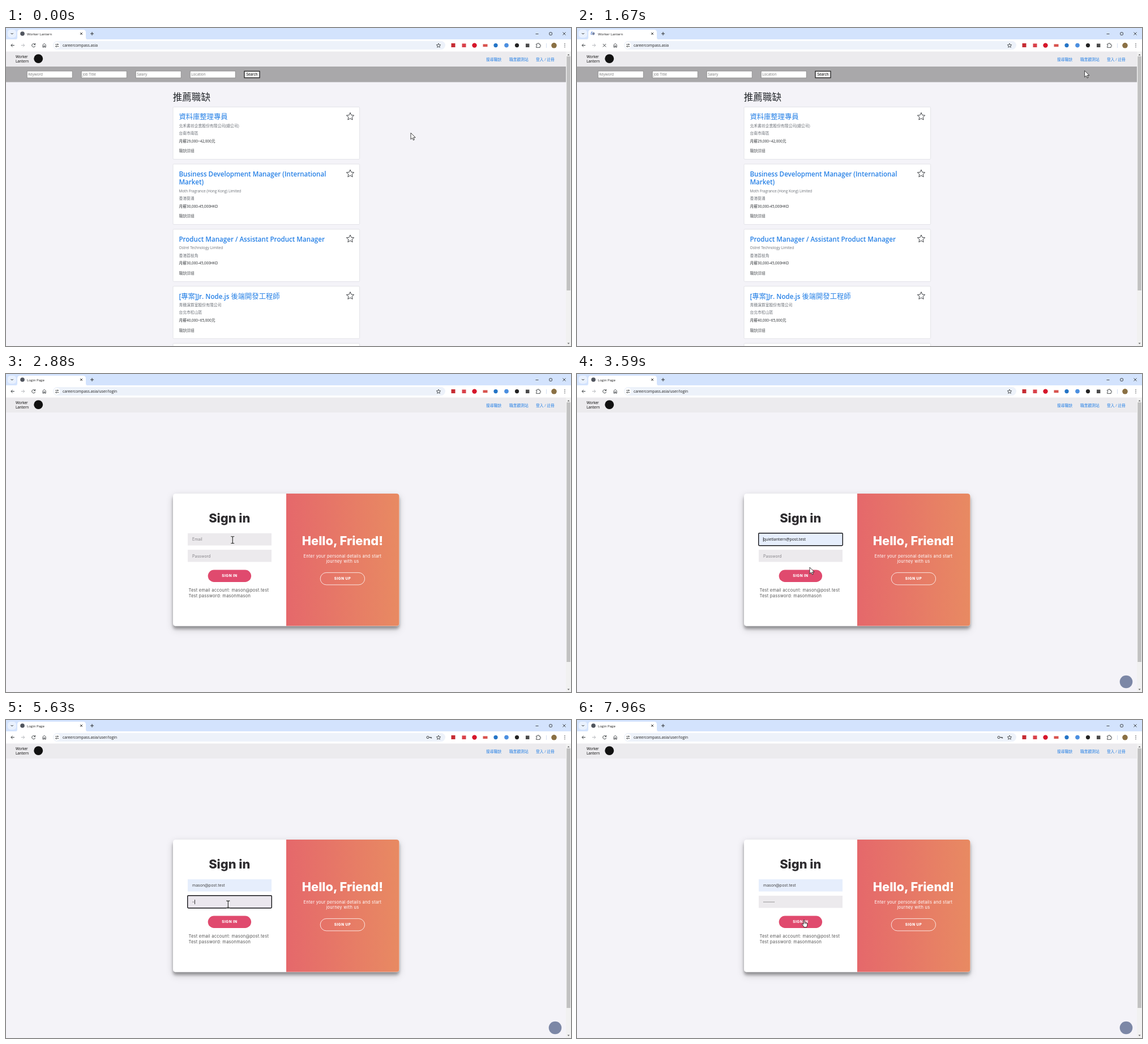
An HTML page that plays this animation: 998 px wide and 561 px high, repeating every 8 s.

```html
<!DOCTYPE html>
<html lang="zh-Hant">
<head>
<meta charset="utf-8">
<title>Job board sign-in</title>
<style>
  html, body { margin: 0; width: 100%; height: 100%; overflow: hidden; background: #f4f3f8; }
  svg { display: block; width: 100%; height: 100%; }
  text { font-family: "Open Sans", "Noto Sans CJK TC", "Noto Sans CJK", sans-serif; white-space: pre; }
  .brand, .brand text { font-family: Inter, sans-serif; }
  text.system { font-family: "Open Sans", sans-serif; }
</style>
</head>
<body>
<svg id="stage" viewBox="0 0 998 561" xmlns="http://www.w3.org/2000/svg"></svg>
<script>
const LOOP = 8000;
const BLUE = '#2680e6', INK = '#212529', GREY = '#6c7178';
const MAIL = 'mason@post.test', OTHER_MAIL = 'quietlantern@post.test';

// Moments of the session, in ms
const CLICK_LINK = 1480, PAGE_IN = 1900, FONTS_IN = 2600, LOADED = 2850, BADGE_IN = 3000;
const MAIL_FOCUS = 3100, PREVIEW = 3300, PREVIEW_2 = 3800, MAIL_SET = 4300;
const PASS_FOCUS = 5000, TYPE_START = 5200, KEY_GAP = 190, PASS_LENGTH = 10, SUBMIT = 7850;

// Pointer path: time, x, y
const PATH = [
  [0, 715, 185], [120, 715, 185], [800, 844, 49], [1200, 951, 57], [1520, 951, 57],
  [2210, 508, 206], [2900, 400, 293], [3150, 400, 293], [3590, 411, 341], [4330, 409, 343],
  [4800, 392, 327], [5100, 392, 326], [6550, 393, 323], [7250, 393, 323], [7720, 401, 353], [LOOP, 401, 353]
];

const rect = (x, y, w, h, fill, more = '') =>
  `<rect x="${x}" y="${y}" width="${w}" height="${h}" fill="${fill}" ${more}/>`;
const circle = (x, y, r, fill, more = '') => `<circle cx="${x}" cy="${y}" r="${r}" fill="${fill}" ${more}/>`;
const line = (d, color = '#3c4043', width = 1, more = '') =>
  `<path d="${d}" fill="none" stroke="${color}" stroke-width="${width}" ${more}/>`;
const text = (x, y, size, fill, s, more = '') =>
  `<text x="${x}" y="${y}" font-size="${size}" fill="${fill}" ${more}>${s}</text>`;
const group = (id, body, more = '') => `<g id="${id}" ${more}>${body}</g>`;

// Han runs are set a little larger and lighter than Latin ones
const mixed = (x, y, size, fill, s, more = '') => text(x, y, size, fill,
  s.split(/([\u2e80-\u9fff]+)/).map((run, i) => i % 2
    ? `<tspan font-size="${(size * 1.06).toFixed(2)}" font-weight="400">${run}</tspan>` : run).join(''), more);

function star(cx, cy, r, color, width) {
  const points = Array.from({ length: 10 }, (_, i) => {
    const a = (i / 5 - 0.5) * Math.PI, d = i % 2 ? r * 0.46 : r;
    return `${(cx + d * Math.cos(a)).toFixed(2)} ${(cy + d * Math.sin(a)).toFixed(2)}`;
  });
  return line(`M${points.join('L')}Z`, color, width, 'stroke-linejoin="round"');
}

function browser() {
  const tabs = rect(0, 0, 998, 21, '#d3e3fd') + rect(3, 3, 15, 14, '#e9f1fe', 'rx="5"') +
    line('M8.6 9l2 2l2-2', '#1f1f1f') +
    '<path d="M16 20.5q4 0 4-4V8q0-5 5-5H136q5 0 5 5v8.5q0 4 4 4Z" fill="#fff"/>' +
    text(37, 12.6, 6.1, '#1f1f1f', '', 'id="tabTitle"') +
    group('favicon', circle(29, 10, 3.8, '#50555e')) +
    group('spinner', circle(29, 10, 2.4, '#7886a5') + line('M29 6A4 4 0 0 1 33 10', '#3569c8', 1.1)) +
    line('M131 8l4 4m0-4l-4 4M149 10h6m-3-3v6', '#1f1f1f', 0.9) +
    line('M935.5 10.5h5M983.5 7.5l5 5m0-5l-5 5', '#1f1f1f', 0.8) +
    rect(959.8, 7.8, 4.6, 4.6, 'none', 'rx="1" stroke="#1f1f1f" stroke-width=".8"');
  const bar = rect(0, 20, 998, 21.5, '#fff') + rect(83, 23, 693, 15, '#edf2fa', 'rx="7.5"') +
    line('M14.8 30.6H9m2.6-2.8L8.8 30.6l2.8 2.8') +
    line('M26.8 30.6h5.8m-2.6-2.8l2.8 2.8l-2.8 2.8', '#b4b7bb') +
    group('reload', line('M51 28.7A3 3 0 1 0 51.6 31.5M51.6 27v2.4h-2.4')) +
    group('stop', line('M45.8 28l5.4 5.4m0-5.4l-5.4 5.4')) +
    line('M65 34V29.6L67.6 27.4L70.2 29.6V34H68.4V31.4H66.8V34Z', '#3c4043', 0.9) +
    circle(90, 30.6, 5.8, '#fff') +
    line('M87 29h2.6m2.6 0h1M87 32.5h1m2.6 0h2.6', '#3c4043', 0.9) +
    circle(91, 29, 1, 'none', 'stroke="#3c4043" stroke-width=".8"') +
    circle(89, 32.5, 1, 'none', 'stroke="#3c4043" stroke-width=".8"') +
    text(100, 33, 6.75, '#1f1f1f', '', 'id="address"') +
    group('key', circle(745, 30.6, 2, 'none', 'stroke="#3c4043"') + line('M747 30.6h4.6v2m-1.8-2v1.6')) +
    star(764, 31, 3.9, '#3c4043', 0.9);
  const tools = rect(786.5, 27, 7, 7, '#c62c33') + rect(805.5, 27.5, 7, 6.5, '#d9414a', 'id="toolMark"') +
    circle(827.5, 30.6, 4.2, '#d6162a') + rect(842.5, 28.5, 8, 4.6, '#d8534e') +
    circle(865, 30.6, 3.6, '#2374c6') + circle(884, 30.6, 3.8, '#4b8fe0') +
    circle(902.5, 30.6, 3.6, '#222') + rect(918, 27.6, 6.4, 6.4, '#4a4a4a') +
    line('M936.6 28.2h2.2q0-1.6 1.2-1.6t1.2 1.6h2v2q1.4 0 1.4 1.1t-1.4 1.1v2h-6.6v-2q1.2 0 1.2-1.1t-1.2-1.1Z', '#3c4043', 0.9) +
    line('M954.5 27v8', '#c9d7ee', 0.8) + circle(968, 30.8, 4.8, '#8a7044') +
    [27.8, 30.6, 33.4].map(y => circle(987, y, 0.75, '#3c4043')).join('');
  return tabs + bar + tools;
}

const site = () => rect(0, 41, 989, 520, '#f4f3f8') + rect(0, 41, 989, 27, '#ecebee') +
  text(17, 53, 6.4, '#000', 'Worker') + text(17, 61, 6.4, '#000', 'Lantern') + circle(57.2, 54.2, 7.9, '#111') +
  mixed(848, 58, 6.4, BLUE, '搜尋職缺') + mixed(889, 58, 6.4, BLUE, '職業觀測站') +
  mixed(936, 58, 6.4, BLUE, '登入 / 註冊') +
  rect(989, 41, 9, 520, '#f1f1f1') + rect(990.3, 50, 6.6, 413, '#c1c1c1', 'id="thumb"') +
  '<path d="M991.6 48.3l2-2.4l2 2.4ZM991.6 555.4l2 2.4l2-2.4Z" fill="#606060"/>';

function job(y, titles, lines) {
  const extra = (titles.length - 1) * 14.3;
  const colors = [GREY, GREY, INK, '#5a5d61'], drops = [35.2, 48.8, 62.4, 80];
  return rect(295, y, 329.6, 92.3 + extra, '#fff', 'rx="1.5" stroke="#dedde2" stroke-width=".8"') +
    star(608, y + 17, 7, '#2b2e33', 0.9) +
    titles.map((s, i) => mixed(305.4, y + 22 + i * 14.3, 11.6, BLUE, s, 'font-weight="600"')).join('') +
    [...lines, '職缺詳細'].map((s, i) => mixed(305.4, y + drops[i] + extra, 6.45, colors[i], s)).join('');
}

function home() {
  const fields = ['Keyword', 'Job Title', 'Salary', 'Location'].map((s, i) => {
    const x = 37.2 + i * 96;
    return rect(x, 76, 80, 12, '#fff', 'stroke="#858585" stroke-width=".8"') + text(x + 2, 84.4, 6.4, '#777', s);
  }).join('');
  return rect(0, 68, 989, 27.5, '#a9a8aa') + fields +
    rect(421, 76.2, 27, 11.6, '#f0f0f0', 'stroke="#151515" stroke-width="1.2"') +
    text(434.5, 84.3, 6.3, '#000', 'Search', 'text-anchor="middle"') +
    mixed(294.8, 128, 15.6, INK, '推薦職缺') +
    job(139.3, ['資料庫整理專員'], ['北禾書坊企業股份有限公司(總公司)', '台南市南區', '月薪29,000~42,000元']) +
    job(240, ['Business Development Manager (International', 'Market)'],
      ['Moth Fragrance (Hong Kong) Limited', '香港葵涌', '月薪30,000-45,000HKD']) +
    job(355, ['Product Manager / Assistant Product Manager'],
      ['Ostrel Technology Limited', '香港荔枝角', '月薪30,000-45,000HKD']) +
    job(455.6, ['[專案]Jr. Node.js 後端開發工程師'],
      ['青穗演算室股份有限公司', '台北市松山區', '月薪40,000~65,000元']) +
    rect(295, 556.3, 329.6, 20, '#fff', 'rx="1.5" stroke="#dedde2" stroke-width=".8"');
}

function login() {
  const mid = 'text-anchor="middle"', spaced = 'letter-spacing=".26"', label = `${mid} font-weight="800" letter-spacing=".52"`;
  const copy = text(394.8, 262.4, 21.8, '#2e2c2f', 'Sign in', `${mid} font-weight="800"`) +
    text(329, 294.4, 7, '#858388', 'Email', 'id="mailHint"') +
    text(329, 323.5, 7, '#858388', 'Password', 'id="passHint"') +
    text(395, 358.2, 6.4, '#fff', 'SIGN IN', label) +
    text(322.4, 384.4, 7.5, '#555', `Test email account: ${MAIL}`, spaced) +
    text(322.4, 394.2, 7.5, '#555', 'Test password: masonmason', spaced) +
    text(594.4, 301.8, 21.8, '#fff', 'Hello, Friend!', `${mid} font-weight="800"`) +
    text(594.4, 323.6, 7.5, '#fff', 'Enter your personal details and start', `${mid} ${spaced}`) +
    text(594.4, 333.4, 7.5, '#fff', 'journey with us', `${mid} ${spaced}`) +
    text(594.6, 363.1, 6.4, '#fff', 'SIGN UP', label);
  return rect(295, 211, 399.5, 233.6, '#fff', 'rx="5" filter="url(#shadow)"') +
    '<path d="M495 211H689.5q5 0 5 5V439.6q0 5-5 5H495Z" fill="url(#warm)"/>' +
    rect(321, 281, 148, 21.5, '#eceaed', 'id="mailBox"') + rect(321, 310, 148, 21.5, '#eceaed', 'id="passBox"') +
    rect(357, 345.5, 76, 21.5, '#e04a6e', 'id="signIn" rx="10.7"') +
    rect(555.4, 350.4, 78.2, 21.5, 'none', 'id="signUp" rx="10.7" stroke="#fff" stroke-width=".8"') +
    group('copy', copy) +
    text(329, 294.4, 7, '#333', '', 'id="mail"') +
    group('dots', Array.from({ length: PASS_LENGTH }, (_, i) => circle(329.9 + i * 2.03, 321, 0.62, '#333')).join('')) +
    rect(320.7, 280.7, 148.6, 22, 'none', 'id="ring" rx="1.4" stroke="#141418" stroke-width="1.4"') +
    rect(329, 288, 0.8, 8, '#111', 'id="caret"');
}

const pointers =
  group('arrow', '<path d="M0 0V11.4L2.7 8.9L4.5 12.9L6.3 12.1L4.6 8.2H8.2Z" fill="#fff" stroke="#111" stroke-width=".8" stroke-linejoin="round"/>') +
  group('beam', line('M-3-6H-1Q0-6 0-5Q0-6 1-6H3M0-5V5M-3 6H-1Q0 6 0 5Q0 6 1 6H3', '#fff', 2.2) +
    line('M-3-6H-1Q0-6 0-5Q0-6 1-6H3M0-5V5M-3 6H-1Q0 6 0 5Q0 6 1 6H3', '#111', 1.1)) +
  group('hand', '<path d="M-1 .7Q-1-.5 0-.5T1 .7V4.2Q2 3.5 2.6 4.5Q3.6 4 4.1 5Q5.6 4.6 5.8 6.2V9Q5.7 10.4 4.8 11.3V12.6H-.4V11.4L-3.3 7.7Q-3.6 6.4-2.4 6.4L-1 7.5Z" fill="#fff" stroke="#111" stroke-width=".8" stroke-linejoin="round"/>' +
    line('M1 4.2V7M2.6 4.6V7M4.2 5V7', '#111', 0.5));

document.getElementById('stage').innerHTML = `
  <defs>
    <linearGradient id="warm"><stop stop-color="#e5686b"/><stop offset="1" stop-color="#e88a62"/></linearGradient>
    <filter id="shadow" x="-20%" y="-20%" width="140%" height="150%">
      <feDropShadow dx="0" dy="5.2" stdDeviation="2.6" flood-opacity=".3"/>
      <feDropShadow dx="0" dy="4" stdDeviation="6" flood-opacity=".2"/>
    </filter>
  </defs>` +
  site() + group('home', home()) + group('login', login(), 'class="brand"') +
  circle(970, 543, 11.3, '#7c87a6', 'id="badge"') + browser() + group('pointer', pointers);

const el = {};
document.querySelectorAll('[id]').forEach(node => { el[node.id] = node; });
const show = (id, on) => el[id].setAttribute('display', on ? 'inline' : 'none');
const set = (id, attrs) => Object.entries(attrs).forEach(([k, v]) => el[id].setAttribute(k, v));
const write = (id, s) => { if (el[id].textContent !== s) el[id].textContent = s; };

function pointerAt(t) {
  const i = Math.max(1, PATH.findIndex(p => p[0] > t));
  const [t0, x0, y0] = PATH[i - 1], [t1, x1, y1] = PATH[i];
  const u = (t - t0) / (t1 - t0), e = u * u * (3 - 2 * u);
  return [x0 + (x1 - x0) * e, y0 + (y1 - y0) * e];
}

function pointerKind(x, y, onLogin) {
  const inside = (l, t, r, b) => x >= l && x <= r && y >= t && y <= b;
  if (inside(936, 51, 970, 61) || inside(889, 51, 923, 61) || inside(848, 51, 875, 61)) return 'hand';
  if (!onLogin) return 'arrow';
  if (inside(321, 281, 469, 302.5) || inside(321, 310, 469, 331.5)) return 'beam';
  return inside(357, 345.5, 433, 367) ? 'hand' : 'arrow';
}

function drawForm(t) {
  const fonts = t >= FONTS_IN, onPass = t >= PASS_FOCUS, focused = t >= MAIL_FOCUS && t < SUBMIT;
  show('copy', fonts);
  set('signIn', fonts ? { x: 356.7, width: 76.4 } : { x: 357.8, width: 74.2 });
  set('signUp', fonts ? { x: 555.2, width: 78.4 } : { x: 555.8, width: 77.2 });

  const filled = t >= PREVIEW, chosen = t >= MAIL_SET;
  show('mailHint', !filled);
  write('mail', !filled ? '' : t < PREVIEW_2 ? OTHER_MAIL : MAIL);
  set('mail', { class: chosen ? '' : 'system', fill: chosen ? '#444' : '#111' });
  set('mailBox', { fill: filled ? '#e6eefc' : '#eceaed' });

  const typed = Math.max(0, Math.min(PASS_LENGTH, Math.floor((t - TYPE_START) / KEY_GAP)));
  show('passHint', !typed);
  show('key', typed > 0);
  set('passBox', { fill: onPass && focused ? '#ebe7ee' : '#eceaed' });
  [...el.dots.children].forEach((dot, i) => dot.setAttribute('display', i < typed ? 'inline' : 'none'));

  const since = typed ? TYPE_START + typed * KEY_GAP : onPass ? PASS_FOCUS : chosen ? MAIL_SET : MAIL_FOCUS;
  const caretX = onPass ? 329 + typed * 2.03 : chosen ? 329 + el.mail.getComputedTextLength() : 328.8;
  show('ring', focused);
  set('ring', { y: onPass ? 309.7 : 280.7 });
  show('caret', focused && (t - since) % 1060 < 530);
  set('caret', { x: caretX, y: onPass ? 317 : 288 });
}

function draw(t) {
  const onLogin = t >= PAGE_IN, loading = t >= CLICK_LINK && t < LOADED;
  show('home', !onLogin);
  show('login', onLogin);
  show('badge', t >= BADGE_IN);
  show('spinner', loading);
  show('favicon', !loading);
  show('stop', loading);
  show('reload', !loading);
  set('spinner', { transform: `rotate(${t * 0.36} 29 10)` });
  set('toolMark', { fill: onLogin && loading ? '#d9d9dc' : '#d9414a' });
  set('thumb', { height: onLogin ? 458 : 413 });
  write('tabTitle', onLogin ? 'Login Page' : 'Worker Lantern');
  write('address', 'careercompass.asia' + (onLogin ? '/user/login' : ''));
  drawForm(t);

  const [x, y] = pointerAt(t), kind = pointerKind(x, y, onLogin);
  set('pointer', { transform: `translate(${x.toFixed(2)} ${y.toFixed(2)})` });
  ['arrow', 'beam', 'hand'].forEach(id => show(id, id === kind));
}

const start = performance.now();
function tick() {
  draw((performance.now() - start) % LOOP);
  requestAnimationFrame(tick);
}
tick();
</script>
</body>
</html>
```
